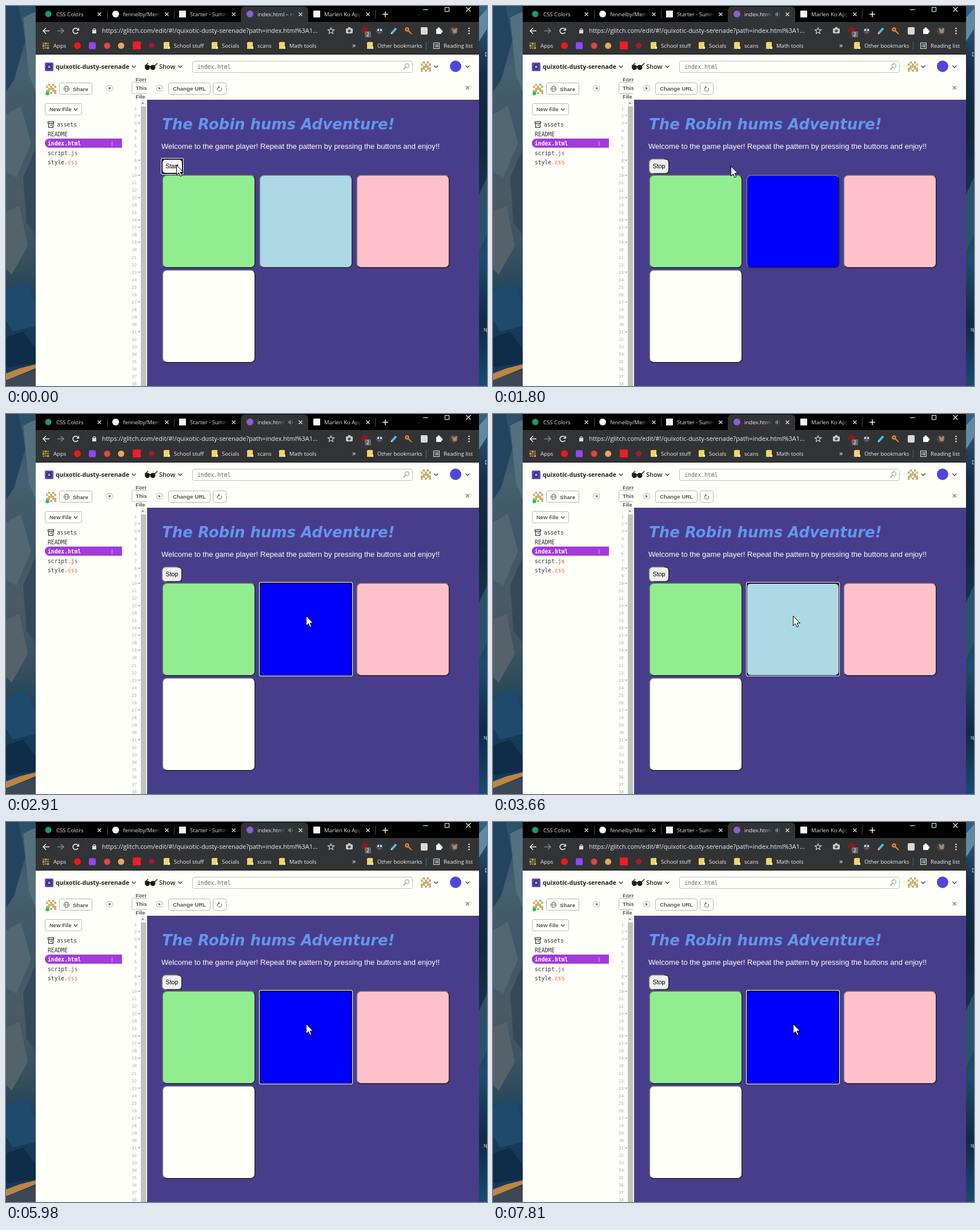
An HTML page with a canvas that plays this animation: 842 by 665 pixels, repeating every 8000 ms.

```html
<!DOCTYPE html>
<html lang="en">
<head>
<meta charset="utf-8">
<title>Memory game</title>
<style>
html, body { margin: 0; width: 100%; height: 100%; overflow: hidden; background: #000; }
canvas { display: block; }
</style>
</head>
<body>
<canvas id="stage" width="842" height="665"></canvas>
<script>
const W = 842, H = 665, LOOP = 8000;
const PAPER = '#fffffa', BAR = '#323335', PURPLE = '#483d8b', INK = '#30323c';
const UI = '"Open Sans", sans-serif';
const ARIAL = '"Liberation Sans", Arial, sans-serif';
const MONO = '"DejaVu Sans Mono", monospace';
const PROJECT = 'quixotic-dusty-serenade';

const screen = document.getElementById('stage').getContext('2d');
let g = screen;

function text(s, x, y, font, color, align = 'left') {
  g.font = font;
  g.fillStyle = color;
  g.textAlign = align;
  g.fillText(s, x, y);
}
function rect(x, y, w, h, color) {
  g.fillStyle = color;
  g.fillRect(x, y, w, h);
}
function round(x, y, w, h, r, fill, stroke) {
  g.beginPath();
  g.roundRect(x, y, w, h, r);
  if (fill) { g.fillStyle = fill; g.fill(); }
  if (stroke) { g.strokeStyle = stroke; g.lineWidth = 1; g.stroke(); }
}
function disc(x, y, r, color) {
  g.beginPath();
  g.arc(x, y, r, 0, 7);
  g.fillStyle = color;
  g.fill();
}
function arc(x, y, r, from, to, color, width) {
  g.beginPath();
  g.arc(x, y, r, from, to);
  g.strokeStyle = color;
  g.lineWidth = width;
  g.stroke();
}
function trace(points) {
  g.beginPath();
  for (let i = 0; i < points.length; i += 2) g.lineTo(points[i], points[i + 1]);
}
function line(points, color, width = 1) {
  trace(points);
  g.strokeStyle = color;
  g.lineWidth = width;
  g.stroke();
}
function poly(points, color) {
  trace(points);
  g.closePath();
  g.fillStyle = color;
  g.fill();
}
function cross(x, y, r, color, width = 1.2) {
  line([x - r, y - r, x + r, y + r], color, width);
  line([x - r, y + r, x + r, y - r], color, width);
}
function chevron(x, y, r = 3.5, color = '#444', width = 1.3) {
  line([x - r, y - r / 2, x, y + r / 2, x + r, y - r / 2], color, width);
}
function clipped(x, y, w, h, draw) {
  g.save();
  g.beginPath();
  g.rect(x, y, w, h);
  g.clip();
  draw();
  g.restore();
}
function vertical(y0, y1, ...colors) {
  const grad = g.createLinearGradient(0, y0, 0, y1);
  colors.forEach((c, i) => grad.addColorStop(i / (colors.length - 1), c));
  return grad;
}
function fadingText(s, x, end, y, color) {
  const grad = g.createLinearGradient(end - 14, 0, end, 0);
  grad.addColorStop(0, color);
  grad.addColorStop(1, 'rgba(255,255,255,0)');
  clipped(x, y - 12, end - x, 18, () => text(s, x, y, '9.6px ' + UI, grad));
}

function wallpaper() {
  rect(0, 0, 52, H, vertical(0, H, '#2c4f6b', '#45606f', '#3e5768', '#4b5b66', '#35505f', '#183a55', '#123a60'));
  poly([0, 0, 22, 0, 34, 60, 14, 130, 0, 150], '#23435e');
  poly([30, 20, 52, 10, 52, 150, 40, 120], '#55707d');
  poly([0, 190, 26, 175, 44, 240, 18, 300, 0, 290], '#526773');
  poly([52, 250, 30, 300, 36, 380, 52, 400], '#33495a');
  poly([0, 360, 24, 350, 38, 420, 10, 470, 0, 460], '#56626a');
  poly([0, 500, 34, 480, 52, 520, 52, 560, 12, 570, 0, 550], '#1d4a6d');
  poly([0, 580, 30, 570, 52, 600, 52, 625, 0, 632], '#0f2c49');
  poly([0, 643, 24, 634, 52, 627, 52, 634, 30, 643, 0, 655], '#bb8543');
  poly([0, 655, 30, 644, 52, 637, 52, 665, 0, 665], '#3c4854');
  rect(828, 0, 14, H, vertical(0, H, '#346285', '#142f48', '#10263a', '#16344e', '#204c6d', '#0f2a44', '#174a74'));
  poly([828, 20, 842, 5, 842, 40, 828, 62], '#6189a2');
  poly([828, 330, 842, 300, 842, 400, 828, 430], '#2b526c');
  text('D', 838, 88, '9px ' + UI, '#fff');
  text('sp', 836, 569, '9px ' + UI, '#fff');
}

function tabStrip() {
  rect(52, 0, 776, 28, '#000');
  round(411, 1, 118, 34, [7, 7, 0, 0], BAR);
  disc(74, 14, 5.5, '#12a06a');
  disc(192, 14, 6, '#f4f4f4');
  round(303, 8, 12, 12, 1, '#f4f4f4');
  disc(427, 14, 6, '#8b5fd6');
  round(538, 8, 12, 12, 1, '#f4f4f4');
  fadingText('CSS Colors', 88, 155, 18, '#e6e6e6');
  fadingText('fennelby/Memory', 205, 272, 18, '#e6e6e6');
  fadingText('Starter - Summer', 322, 388, 18, '#e6e6e6');
  fadingText('Marlen Ko Applic', 557, 623, 18, '#e6e6e6');
  for (const x of [163, 281, 398, 515, 633]) cross(x + .5, 14.5, 3, '#eee', 1.3);
  for (const x of [177, 294, 646]) rect(x, 7, 1, 15, '#4b4b4b');
  line([659, 14.5, 669, 14.5], '#fff', 1.5);
  line([664, 9.5, 664, 19.5], '#fff', 1.5);
  line([730, 6.5, 739, 6.5], '#fff');
  g.strokeRect(768.5, 2.5, 7, 7);
  cross(809.5, 6, 4, '#fff', 1.1);
}

function toolbar() {
  rect(52, 28, 776, 57, BAR);
  line([76, 43.5, 65, 43.5], '#f2f2f2', 1.5);
  line([70, 38.5, 65, 43.5, 70, 48.5], '#f2f2f2', 1.5);
  line([90, 43.5, 101, 43.5], '#858585', 1.5);
  line([96, 38.5, 101, 43.5, 96, 48.5], '#858585', 1.5);
  arc(122, 43.5, 4.8, .5, 5.4, '#f2f2f2', 1.6);
  poly([128, 38, 128, 43, 123, 43], '#f2f2f2');
  rect(151, 42, 7, 6, '#ddd');
  arc(154.5, 42, 2.3, 3.14, 6.29, '#ddd', 1.2);
  text('https://glitch.com/edit/#!/' + PROJECT + '?path=index.html%3A1...', 168, 47, '10.9px ' + UI, '#eee');

  const star = [];
  for (let i = 0; i <= 10; i++) {
    const r = i % 2 ? 2.6 : 5.8, a = i * Math.PI / 5 - Math.PI / 2;
    star.push(569 + r * Math.cos(a), 43.5 + r * Math.sin(a));
  }
  line(star, '#ddd', 1.1);

  round(595, 39, 12, 9, 2, '#c9c9c9');
  rect(599, 37, 4, 3, '#c9c9c9');
  disc(601, 43.5, 2.6, '#555');
  disc(628, 42, 6, '#8d1620');
  round(628, 44, 11, 11, 2, '#64676b');
  text('2', 633.5, 53, '8.5px ' + UI, '#fff', 'center');
  disc(654, 43.5, 5.5, '#40536a');
  disc(651.5, 42, 1.7, '#eee');
  disc(656.5, 42, 1.7, '#eee');
  rect(652, 46, 4, 1.5, '#c93b3b');
  line([675, 48, 683, 39], '#53bfe4', 4);
  line([674, 49, 676, 47], '#eee', 1.5);
  arc(702, 41, 2.5, 0, 7, '#ee8127', 2.5);
  line([704, 43, 710, 49], '#ee8127', 2.2);
  round(726, 37, 12, 13, 2, '#d9d9d9');
  round(753, 40, 9, 9, 1, '#f5f5f5');
  disc(757.5, 39.5, 2.2, '#f5f5f5');
  disc(762.3, 44.5, 2.2, '#f5f5f5');
  disc(784, 43.5, 7, '#4d443b');
  poly([780, 38, 784, 41, 790, 38, 789, 47, 783, 48], '#a18b70');
  for (const y of [39, 43.5, 48]) disc(810.5, y, 1.3, '#f2f2f2');
}

function folder(x) {
  poly([x, 64, x + 2, 63, x + 10, 63, x + 10, 75, x, 75], '#f3d369');
  rect(x + 8, 71, 3, 4, '#fff0a8');
}

function bookmarks() {
  const dots = ['#e84c3d', '#f0b323', '#3ca55c'];
  for (let i = 0; i < 9; i++) rect(64 + i % 3 * 4, 64 + (i / 3 | 0) * 4, 3, 3, dots[(i + (i / 3 | 0)) % 3]);
  disc(125, 69.5, 6, '#f01616');
  round(145, 63.5, 12, 12, 2, '#9147ff');
  disc(177, 69.5, 5.5, '#e0473a');
  disc(201.5, 69.5, 5.5, '#eda558');
  rect(222, 62, 14, 14, '#ee1d24');
  disc(255, 69.5, 5, '#a9182d');
  const font = '9.55px ' + UI;
  for (const [x, label] of [[276, 'School stuff'], [360, 'Socials'], [422, 'scans'], [478, 'Math tools'], [632, 'Other bookmarks']]) {
    folder(x);
    text(label, x + 18, 73, font, '#f2f2f2');
  }
  text('Apps', 83, 73, font, '#f2f2f2');
  text('»', 606, 73, '13px ' + UI, '#f2f2f2');
  rect(735, 62, 1, 15, '#5c5c5c');
  g.strokeStyle = '#e8e8e8';
  g.lineWidth = 1;
  g.strokeRect(748.5, 64.5, 10, 10);
  for (const y of [67, 69, 71]) {
    rect(750, y, 1, 1, '#e8e8e8');
    rect(752, y, 5, 1, '#e8e8e8');
  }
  text('Reading list', 766, 73, font, '#f2f2f2');
  rect(52, 84, 776, 1, '#141414');
}

function identicon(x, y) {
  [10, 21, 14, 27, 21].forEach((bits, row) => {
    for (let col = 0; col < 5; col++) {
      if (bits >> col & 1) rect(x + col * 3.6, y + row * 3.6, 3.6, 3.6, '#cba868');
    }
  });
}
function outlineButton(x, y, w, h) {
  round(x + .5, y + .5, w - 1, h - 1, 3, PAPER, '#b5b5b5');
}
function paneToggle(x, dir) {
  outlineButton(x, 139, 12, 10);
  poly([x + 6 - 2 * dir, 141.5, x + 6 - 2 * dir, 146.5, x + 6 + 2 * dir, 144], '#666');
}

function editor() {
  const bold = 'bold 9.7px ' + ARIAL, mono = '9.7px ' + MONO;
  rect(52, 85, 776, 580, PAPER);

  round(68, 99, 15, 15, 2, '#6a3fc4');
  disc(75.5, 106.5, 4.5, '#2b2350');
  disc(75.5, 106.5, 2.5, '#49c5c0');
  text(PROJECT, 87, 110, 'bold 10.7px ' + UI, '#222');
  chevron(224, 106);
  disc(247.5, 107.5, 4.5, '#1c1c1c');
  disc(257, 107.5, 4.5, '#1c1c1c');
  line([243, 105, 249, 100], '#1c1c1c', 1.5);
  line([250, 106, 260, 105, 265, 100], '#1c1c1c', 1.5);
  text('Show', 268, 110, '600 11px ' + UI, '#222');
  chevron(305, 106);
  round(326.5, 96.5, 385, 20, 3, PAPER, '#bdbdbd');
  text('index.html', 335, 110, mono, '#666');
  arc(702, 104.5, 3.6, 0, 7, '#888', 1);
  line([699.5, 107, 696, 111], '#888', 1.2);
  identicon(726, 97);
  chevron(753, 106);
  disc(787, 105.5, 10, '#5146dc');
  chevron(808, 106);

  identicon(70, 136);
  disc(72.5, 153, 3.3, '#14cc5b');
  outlineButton(93, 134, 58, 21);
  arc(106, 145, 4.8, 0, 7, '#777', 1);
  g.beginPath();
  g.ellipse(106, 145, 2.2, 4.8, 0, 0, 7);
  g.stroke();
  line([101, 145, 111, 145], '#777');
  text('Share', 117, 148.5, bold, '#555');
  paneToggle(175, -1);
  clipped(218, 120, 28, 46, () => {
    outlineButton(220, 133, 40, 21);
    ['Format', 'This', 'File'].forEach((s, i) => text(s, 227, 132 + i * 14.8, bold, '#555'));
  });
  paneToggle(263, 1);
  outlineButton(284, 134, 74, 21);
  text('Change URL', 292, 148, bold, '#555');
  outlineButton(362, 134, 24, 21);
  arc(374, 145.5, 3.6, -.6, 4.1, '#777', 1.1);
  poly([371, 140, 375, 142, 371.5, 144.5], '#777');
  cross(808, 143, 3, '#777', 1.3);

  outlineButton(68, 170, 65, 21);
  text('New File', 76, 184, 'bold 9.5px ' + ARIAL, '#555');
  chevron(122, 181, 3);

  g.strokeStyle = '#333';
  g.lineWidth = 1.2;
  g.strokeRect(73.5, 202.5, 10, 3);
  g.strokeRect(74.5, 205.5, 8, 7);
  rect(77, 208, 4, 1, '#333');
  text('assets', 89, 211, mono, INK);
  text('README', 73, 228, mono, INK);
  round(68, 232, 135, 16, [8, 0, 0, 8], '#a33ade');
  text('index.html', 73, 244, 'bold ' + mono, '#fff');
  for (const y of [237, 240, 243]) rect(185, y, 1.3, 1.3, '#fff');
  text('script', 73, 261, mono, INK);
  text('.js', 108, 261, mono, '#b03a3a');
  text('style', 73, 277, mono, INK);
  text('.css', 102.2, 277, mono, '#f0611d');

  const folds = [2, 3, 8, 10, 13, 16, 17, 19, 23, 27, 31];
  for (let n = 1; n <= 38; n++) {
    const y = 178.5 + (n - 1) * 13.05;
    text(n, 229, y + 3, '7.4px ' + MONO, '#a9a9ab', 'right');
    if (folds.includes(n)) chevron(233, y, 2, '#777', 1);
  }
  rect(236, 164, 11, 501, '#f1f1ee');
  rect(236, 176, 9, 489, '#c1c1c1');
  poly([237, 171, 242, 171, 239.5, 168], '#888');
}

function gamePage() {
  rect(247, 164, 581, 501, PURPLE);
  text('The Robin hums Adventure!', 273, 216, 'italic bold 26px "DejaVu Sans", sans-serif', '#6495ed');
  text('Welcome to the game player! Repeat the pattern by pressing the buttons and enjoy!!',
    272, 250, '13.06px ' + ARIAL, '#fff');
  tile(273.5, 295.5, '#90ee90');
  tile(613.5, 295.5, '#ffc0cb');
  tile(273.5, 461.5, PAPER);
}

function bevel(x, y, w, h, r, fill, b = 1.5) {
  const edge = g.createLinearGradient(x, y, x + w, y + h);
  edge.addColorStop(.5, '#767676');
  edge.addColorStop(.5, '#242424');
  round(x, y, w, h, r, edge);
  round(x + b, y + b, w - 2 * b, h - 2 * b, r - b, fill);
}
function tile(x, y, fill) {
  bevel(x, y, 163, 163, 8, fill);
}
function focusRing(x, y, w, h) {
  round(x, y, w, h, 3, '#fff');
  round(x + 1, y + 1, w - 2, h - 2, 2, '#101010');
}

function startButton(started) {
  if (started) {
    bevel(272.5, 267, 36, 27, 7, '#efefef');
  } else {
    focusRing(271, 266, 40, 29);
    round(274, 269, 34, 23, 5, '#fbf5f4');
  }
  text(started ? 'Stop' : 'Start', 279.5, 284, '10.7px ' + ARIAL, '#000');
}

function lightTile(lit, focused) {
  const fill = lit ? '#0000ff' : '#add8e6';
  if (focused) {
    focusRing(443, 294, 164, 165);
    round(445, 297, 160, 160, 6, fill);
  } else {
    tile(443.5, 295.5, fill);
  }
}

function activeTitle(sound) {
  g.save();
  g.globalAlpha = 1 - sound;
  fadingText('index.html – romantic', 440, 506, 18, '#eee');
  g.globalAlpha = sound;
  fadingText('index.html', 440, 489, 18, '#eee');
  poly([494, 12.5, 496, 12.5, 499, 10, 499, 19, 496, 16.5, 494, 16.5], '#777');
  arc(499, 14.5, 2.6, -1, 1, '#777', 1);
  g.restore();
}

function pointer(x, y) {
  g.save();
  g.translate(x + .5, y + .5);
  trace([0, 0, 0, 17, 4, 13.3, 6.7, 19.5, 9.3, 18.4, 6.7, 12.3, 12, 12.3]);
  g.closePath();
  g.fillStyle = '#fff';
  g.strokeStyle = '#000';
  g.lineWidth = 1;
  g.fill();
  g.stroke();
  g.restore();
}

// The screen updates in hard steps: [time, ...values]
const moves = [[0, 298, 278], [530, 378, 283], [680, 412, 283], [830, 416, 280], [2230, 417, 279],
  [2380, 424, 277], [2500, 476, 303], [2620, 520, 345], [2770, 525, 353]];
const sounds = [[0, 0], [1530, .4], [1650, .85], [1800, 1]];
const flips = [1120, 2230, 2910, 3660, 4790, 5680, 5980, 7060, 7810];
const at = (steps, t) => steps.filter(s => s[0] <= t).pop().slice(1);

const backdrop = document.createElement('canvas');
backdrop.width = W;
backdrop.height = H;
g = backdrop.getContext('2d');
[wallpaper, tabStrip, toolbar, bookmarks, editor, gamePage].forEach(draw => draw());
g = screen;

function render() {
  const t = performance.now() % LOOP;
  g.drawImage(backdrop, 0, 0);
  activeTitle(at(sounds, t)[0]);
  startButton(t >= 140);
  lightTile(flips.filter(f => f <= t).length % 2 === 1, t >= 2910);
  pointer(...at(moves, t));
  requestAnimationFrame(render);
}
render();
</script>
</body>
</html>
```
